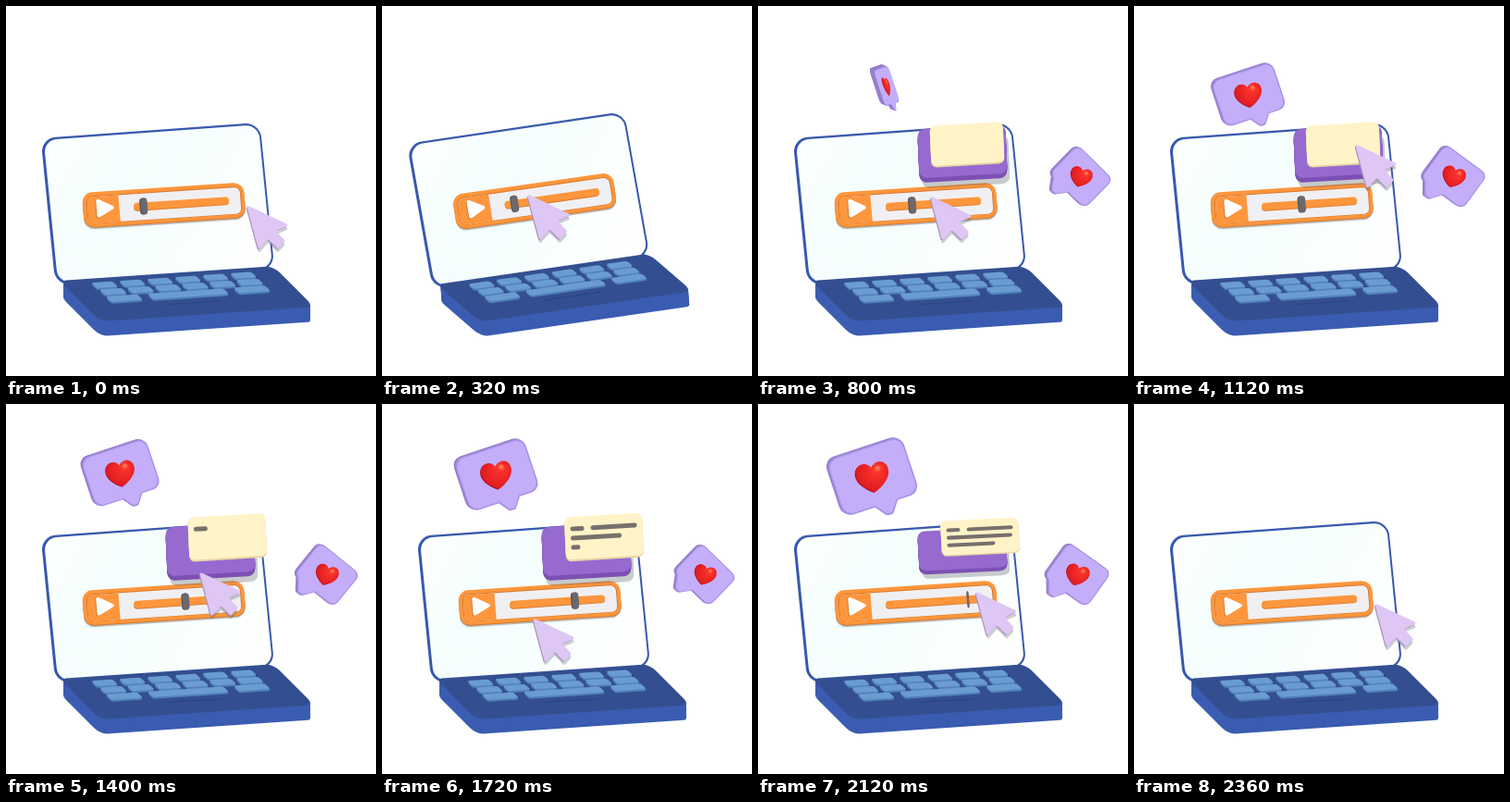
Recreate the animation shown at these times as an HTML page with a canvas. Size 400 by 400 pixels, loop 2.4 s.

```html
<!DOCTYPE html>
<html lang="en">
<head>
<meta charset="utf-8">
<title>Laptop player</title>
<style>
html, body { margin: 0; width: 100%; height: 100%; overflow: hidden; background: #fff; }
canvas { display: block; width: 400px; height: 400px; }
</style>
</head>
<body>
<canvas id="stage" width="400" height="400"></canvas>
<script>
const ctx = document.getElementById('stage').getContext('2d');
const LOOP = 2400, STEP = 40, TAU = Math.PI * 2;

const progress = (t, from, to) => Math.max(0, Math.min(1, (t - from) / (to - from)));
const smooth = u => u * u * (3 - 2 * u);
const easeOut = u => 1 - (1 - u) ** 2;
const mix = (a, b, u) => a + (b - a) * u;
const flipAway = (t, from, to) => Math.cos(progress(t, from, to) * TAU / 4);

function group(draw) {
  ctx.save();
  draw();
  ctx.restore();
}
function fill(color, shape) {
  ctx.beginPath();
  shape();
  ctx.fillStyle = color;
  ctx.fill();
}
const box = (x, y, w, h, r) => () => ctx.roundRect(x, y, w, h, r);
const centred = (x, y, w, h, r) => box(x - w / 2, y - h / 2, w, h, r);
const polygon = (points, r) => () => {
  const first = points[0], last = points[points.length - 1];
  ctx.moveTo((first[0] + last[0]) / 2, (first[1] + last[1]) / 2);
  points.forEach((p, i) => ctx.arcTo(...p, ...points[(i + 1) % points.length], r));
  ctx.closePath();
};

// A slanted surface: x runs right and up by rise, y runs down and right by lean.
function plane(x, y, rise, lean, draw) {
  group(() => {
    ctx.transform(1, -rise, lean, 1, x, y);
    draw();
  });
}
function slab(x, y, rise, lean, depth, edge, face, shape) {
  for (let d = depth; d >= 0; d--) plane(x, y + d, rise, lean, () => fill(d ? edge : face, shape));
}

function keyboard() {
  const x = 58, y = 297, rise = .068, lean = 1;
  slab(x, y, rise, lean, 16, '#3a5cb1', '#344f91', box(0, 0, 231, 44, 7));
  const key = (kx, row, w) =>
    slab(x, y, rise, lean, 2, '#5180bc', '#6a9cd1', centred(kx, 7.2 + row * 7.4, w, 6, 2.2));
  for (let i = 0; i < 6; i++) {
    key(41.5 + i * 30, 0, 23);
    key(43.5 + i * 29.5, 1, 24);
  }
  [-1, 0, 1].forEach(side => key(117 + side * 69, 2, side ? 34 : 82));
  plane(x, y, rise, lean, () => fill('#2b4482', box(83, 31, 61, 1, 0)));
}

function screen() {
  plane(37.5, 143, .072, .1, () => {
    const glass = ctx.createLinearGradient(0, 0, 220, 150);
    glass.addColorStop(0, '#fdffff');
    glass.addColorStop(.4, '#f3fefd');
    glass.addColorStop(1, '#ffffff');
    fill('#3859ae', box(0, 0, 237, 159, 16));
    fill(glass, box(3, 2.2, 232, 154.5, 14));
  });
}

function player(t) {
  const orange = '#fd963c', dark = '#d8772c';
  plane(82, 204.5, .066, .08, () => fill('rgba(70,75,90,.35)', box(0, 0, 174.5, 37.5, 11)));
  slab(82, 202, .066, .08, 1, dark, orange, box(0, 0, 174.5, 37.5, 11));
  plane(82, 202, .066, .08, () => {
    fill(dark, box(4, 4, 167, 30, 7));
    fill('#f0f0f3', box(5, 5, 165, 28.5, 6));
    fill(orange, box(5, 5, 34, 28.5, [6, 0, 0, 6]));
    fill(dark, polygon([[13.5, 7], [34, 18], [13.5, 30]], 2));
    fill('#fff', polygon([[14.5, 6.5], [35.5, 18], [14.5, 29]], 2));
    fill(dark, box(54.5, 15.5, 103, 8, 4));
    fill(orange, box(54.5, 14.7, 103, 8, 4));
    const thin = flipAway(t, 2000, 2145);
    if (thin < .01) return;
    ctx.translate(65.5 + .0455 * Math.max(0, t - 405), 18.6);
    ctx.scale(thin, 1);
    fill('#55575f', centred(-.5, .3, 8, 18, 3.5));
    fill('#6d686c', centred(.4, 0, 7, 17.5, 3.5));
  });
}

function laptop(t) {
  const lift = 12 * Math.sin(progress(t, 140, 800) * TAU / 2) ** 2;
  const tilt = .077 * Math.sin(progress(t, 0, 590) * TAU / 2);
  group(() => {
    ctx.translate(200, 290 - lift);
    ctx.rotate(-tilt);
    ctx.translate(-200, -290);
    screen();
    keyboard();
    player(t);
  });
}

function card(x, y, scale, flip, draw) {
  if (scale < .01 || flip < .01) return;
  group(() => {
    ctx.translate(x, y);
    ctx.scale(scale, scale * flip);
    draw();
  });
}
function cards(t) {
  const rise = .06, lean = .045, flip = flipAway(t, 2045, 2230);
  card(221, 157, easeOut(progress(t, 475, 690)), flip, () => {
    const panel = centred(0, 0, 95, 53, 8);
    plane(3, 11, rise, lean, () => fill('rgba(90,95,100,.32)', panel));
    slab(0, 0, rise, lean, 5, '#7d50b4', '#966acf', panel);
  });

  const slide = smooth(progress(t, 1150, 1440));
  const size = mix(.94, 1, slide) * easeOut(progress(t, 620, 770));
  card(mix(226, 240, slide), mix(149, 143, slide), size, flip, () => {
    slab(0, 0, rise, lean, 2, '#e8d7a4', '#fff3c8', centred(0, 0, 84, 46, 6));
    plane(0, 0, rise, lean, () => {
      const text = (x, row, length, start) => {
        const w = length * progress(t, start, start + length * 4);
        if (w > 0) fill('#77706c', box(x, row * 10 - 2.5, w, 5, 2.5));
      };
      text(-36, -1, 15, 1340);
      text(-14, -1, 50, 1410);
      text(-36, 0, 71, 1500);
      text(-36, 1, 52, 1680);
    });
  });
}

function heart(size) {
  const shape = () => {
    ctx.moveTo(0, .95);
    for (const side of [-1, 1]) {
      ctx.moveTo(0, .95);
      ctx.bezierCurveTo(side * .6, .65, side * 1.05, .15, side, -.3);
      ctx.bezierCurveTo(side * .95, -.95, side * .2, -1, 0, -.5);
    }
  };
  const red = ctx.createRadialGradient(.4, -.5, .02, .1, -.1, 1.1);
  red.addColorStop(0, '#ff8a5c');
  red.addColorStop(.2, '#fb332c');
  red.addColorStop(1, '#dc1a1f');
  ctx.scale(size, size);
  fill('#b51220', () => { ctx.translate(-.06, .05); shape(); });
  ctx.translate(.06, -.05);
  fill(red, shape);
}

function bubble({ x, y, w, h, tail, turn, scale, wide, heartSize, heartTurn }) {
  if (scale < .01) return;
  const bottom = h / 2;
  const body = () => {
    centred(0, 0, w, h, w * .13)();
    polygon([[tail - 14, bottom - 3], [tail + 14, bottom - 3], [tail + 3, bottom + 12], [tail - 3, bottom + 12]], 2.5)();
  };
  const layer = (offset, draw) => group(() => {
    ctx.translate(x - offset, y - offset * .4);
    ctx.rotate(turn);
    ctx.scale(scale * wide, scale);
    draw();
  });
  for (let d = wide < .9 ? 5 : 2; d > 0; d--) layer(d, () => fill('#967fca', body));
  layer(0, () => {
    fill('#a892e6', body);
    ctx.scale(.96, .95);
    fill('#c4aefa', body);
    ctx.rotate(heartTurn - turn);
    heart(heartSize);
  });
}

function bubbles(t) {
  const leave = 1 - smooth(progress(t, 2125, 2245));
  const spring = 42 * Math.exp((800 - t) / 350) * Math.sin(TAU * (t - 812) / 420);
  bubble({
    x: mix(139, 124, smooth(progress(t, 800, 1120))),
    y: mix(112, 79 - spring, leave),
    w: 81, h: 61, tail: 5, turn: -.32,
    scale: (.64 + t * .0002) * easeOut(progress(t, 600, 930)) * leave,
    wide: Math.sin(progress(t, 600, 1050) ** 2 * TAU / 4),
    heartSize: 17.5, heartTurn: -.15
  });

  const arrive = easeOut(progress(t, 516, 780)), sway = Math.cos(TAU * (t - 760) / 900);
  bubble({
    x: mix(326, mix(292, 347.5 + 2 * sway, arrive), leave),
    y: mix(205, mix(238, 184.5, arrive), leave),
    w: 55, h: 45, tail: -10, turn: .7 + .08 * sway,
    scale: (1.01 - .03 * sway) * arrive * leave,
    wide: 1, heartSize: 12.5, heartTurn: .3
  });
}

// Eased hops between four resting places, each bent up or down into an arc.
const rest = [260, 215], play = [112, 198], post = [239, 149], low = [163, 231];
const hops = [
  { from: rest, to: play, start: 60, end: 470, bend: 0 },
  { from: play, to: post, start: 500, end: 1040, bend: 37 },
  { from: post, to: low, start: 1160, end: 1720, bend: 0 },
  { from: low, to: rest, start: 1720, end: 2320, bend: -23 }
];
function cursor(t) {
  const hop = hops.findLast(h => t >= h.start) || hops[0];
  const u = smooth(progress(t, hop.start, hop.end));
  const [x, y] = hop.from.map((from, i) => mix(from, hop.to[i], u) + i * hop.bend * Math.sin(u * TAU / 2));
  const size = 1 + .12 * Math.sin(progress(t, 200, 840) * TAU / 2) ** 2;
  const arrow = polygon([[0, 0], [46.5, 22], [31.5, 28], [42, 39], [34, 47.5], [23.5, 37], [13, 48.5]], 1.5);
  const layer = (color, dx, dy) => group(() => {
    ctx.translate(x + dx, y + dy);
    ctx.scale(size, size);
    fill(color, arrow);
  });
  layer('rgba(90,95,105,.3)', 0, 4);
  layer('#a997bb', -1, 1);
  layer('#dec6f5', 0, 0);
}

function render(t) {
  ctx.fillStyle = '#fff';
  ctx.fillRect(0, 0, 400, 400);
  laptop(t);
  cards(t);
  bubbles(t);
  cursor(t);
}

function tick() {
  const t = performance.now() % LOOP;
  render(Math.floor(t / STEP) * STEP);
  requestAnimationFrame(tick);
}
tick();
</script>
</body>
</html>
```
